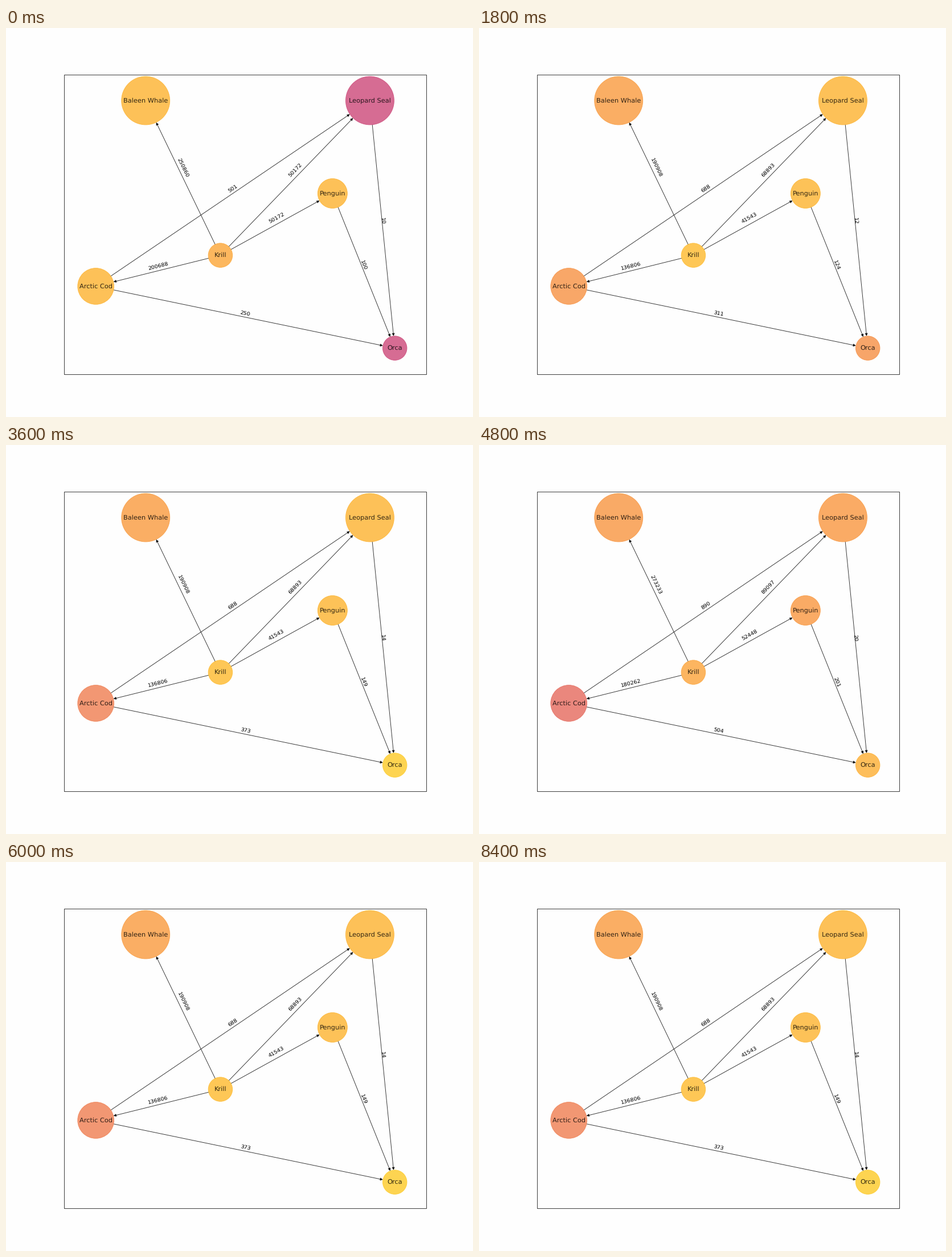
Write a matplotlib script that moves like this. It is 820 px wide and 683 px high and loops after 9000 ms.

```python
import math

import matplotlib.pyplot as plt
from matplotlib.animation import FuncAnimation
from matplotlib.patches import Circle, FancyArrowPatch, Rectangle

W, H, DPI = 820, 683, 64
PT = W / 12 / DPI  # the drawing is laid out for a 12 inch wide sheet
STEPS, INTERVAL = 15, 600
ALPHA = 0.8
CYCLE_START, PERIOD = 6, 4

# name: (grid x, grid y, marker area, (start, calm, peak, settling steps))
NODES = {
    "Baleen Whale": (2, 8, 8000, (.83, .765, .752, 3)),
    "Leopard Seal": (11, 8, 8000, (.50, .83, .755, 3)),
    "Penguin": (9.5, 5, 3000, (.83, .835, .755, 3)),
    "Krill": (5, 3, 2000, (.80, .85, .79, 3)),
    "Arctic Cod": (0, 2, 4500, (.83, .683, .62, 5)),
    "Orca": (12, 0, 2000, (.50, .89, .82, 5)),
}

# Yearly consumption, in the same terms
WHALE = (250860, 190908, 273233, 3)
COD = (200688, 136806, 180262, 3)
SEAL = (50172, 68893, 89097, 3)
PENGUIN = (50172, 41543, 52448, 3)
ORCA = (250, 373, 504, 6)

# (prey, predator, consumption, divisor)
EDGES = [
    ("Krill", "Baleen Whale", WHALE, 1),
    ("Krill", "Arctic Cod", COD, 1),
    ("Krill", "Leopard Seal", SEAL, 1),
    ("Krill", "Penguin", PENGUIN, 1),
    ("Arctic Cod", "Leopard Seal", SEAL, 100),
    ("Arctic Cod", "Orca", ORCA, 1),
    ("Penguin", "Orca", ORCA, 2.5),
    ("Leopard Seal", "Orca", ORCA, 25),
]


def trend(step, start, calm, peak, settle):
    """Settle from start to calm, then swing between calm and peak."""
    level = start + (calm - start) * min(step / settle, 1)
    if step < CYCLE_START:
        return level
    swing = (1 + math.cos(2 * math.pi * step / PERIOD)) / 2
    return level + (peak - calm) * swing


def place(name):
    gx, gy = NODES[name][:2]
    return 157.7 + 43.75 * gx, 562.1 - 54.33 * gy


def radius(name):
    """Marker radius in points."""
    return math.sqrt(NODES[name][2]) / 2 * PT


def draw_edge(prey, predator):
    a, b = place(prey), place(predator)
    ax.add_patch(FancyArrowPatch(
        a, b, arrowstyle="-|>", mutation_scale=10 * PT, lw=PT, color="black",
        alpha=ALPHA, shrinkA=radius(prey), shrinkB=radius(predator), zorder=1))
    angle = math.degrees(math.atan2(a[1] - b[1], b[0] - a[0]))
    angle = (angle + 90) % 180 - 90
    return ax.text((a[0] + b[0]) / 2, (a[1] + b[1]) / 2, "", size=10 * PT,
                   ha="center", va="bottom", rotation=angle, zorder=3)


def draw_node(name):
    x, y = place(name)
    ax.text(x, y, name, size=12 * PT, ha="center", va="center",
            alpha=ALPHA, zorder=4)
    return ax.add_patch(Circle((x, y), radius(name) * DPI / 72, lw=PT,
                               alpha=ALPHA, zorder=2))


plt.rcParams.update({"font.family": "DejaVu Sans", "text.hinting": "none"})
fig = plt.figure(figsize=(W / DPI, H / DPI), dpi=DPI, facecolor="#fefefe")
ax = fig.add_axes([0, 0, 1, 1])
ax.set(xlim=(0, W), ylim=(H, 0), autoscale_on=False)
ax.axis("off")
ax.add_patch(Rectangle((102.2, 82.2), 636, 526, fill=False, ec="black", lw=0.8 * PT))

labels = [draw_edge(*edge[:2]) for edge in EDGES]
discs = {name: draw_node(name) for name in NODES}


def update(step):
    for name, disc in discs.items():
        disc.set_color(plt.cm.plasma(trend(step, *NODES[name][3])))
    for label, (_, _, flow, divisor) in zip(labels, EDGES):
        label.set_text(str(int(trend(step, *flow) / divisor + 1e-6)))
    return [*discs.values(), *labels]


anim = FuncAnimation(fig, update, frames=STEPS, init_func=lambda: update(0),
                     interval=INTERVAL, repeat=True, repeat_delay=0)
plt.show()
```
